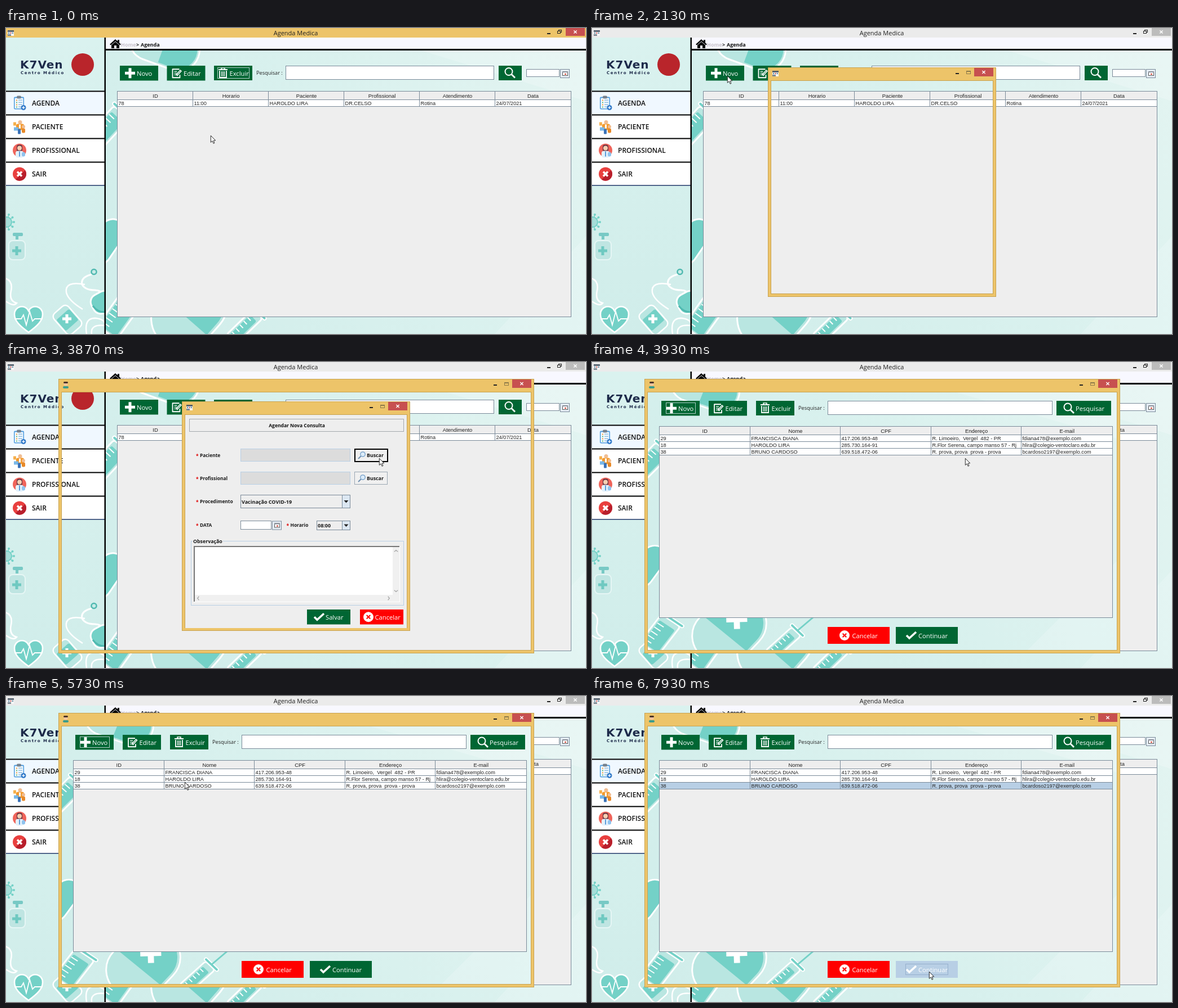
Recreate the animation shown at these times as an HTML page with a canvas. Size 1029 px wide and 544 px high, loop 8000 ms.

```html
<!DOCTYPE html>
<html lang="pt">
<head>
<meta charset="utf-8">
<title>Agenda Medica</title>
<style>
html, body { margin: 0; width: 100%; height: 100%; overflow: hidden; background: #d5eeeb; }
canvas { display: block; width: 1029px; height: 544px; }
</style>
</head>
<body>
<canvas id="stage"></canvas>
<script>
const W = 1029, H = 544, LOOP = 8000, FPS = 15;
const canvas = document.getElementById('stage');
const ctx = canvas.getContext('2d');
const dpr = window.devicePixelRatio || 1;
canvas.width = W * dpr;
canvas.height = H * dpr;

const GREEN = '#006633', RED = '#ff0000', GOLD = '#edc469', GRAY = '#eeeeee';
const LINE = '#7a8a99', SKY = '#b8cfe5', TEAL = '#74d1c7', PALE = '#b9e6e1', DEEP = '#4fb9b0';
const ui = (size, weight = 400) => `${weight} ${size}px "Open Sans", sans-serif`;
const arial = size => `${size}px "Liberation Sans", Arial, sans-serif`;

// --- basic helpers ---
function rect(x, y, w, h, color) {
  ctx.fillStyle = color;
  ctx.fillRect(x, y, w, h);
}
function box(x, y, w, h, color, fill) {
  if (fill) rect(x, y, w, h, fill);
  ctx.strokeStyle = color;
  ctx.lineWidth = 1;
  ctx.strokeRect(x + .5, y + .5, w - 1, h - 1);
}
function text(str, x, y, font, color = '#1a1a1a', align = 'left') {
  ctx.font = font;
  ctx.fillStyle = color;
  ctx.textAlign = align;
  ctx.fillText(str, x, y);
}
function circle(x, y, r, fill, stroke, lw = 1) {
  ctx.beginPath();
  ctx.arc(x, y, r, 0, Math.PI * 2);
  if (fill) { ctx.fillStyle = fill; ctx.fill(); }
  if (stroke) { ctx.strokeStyle = stroke; ctx.lineWidth = lw; ctx.stroke(); }
}
function trace(pts) {
  ctx.beginPath();
  pts.forEach(([x, y], i) => i ? ctx.lineTo(x, y) : ctx.moveTo(x, y));
}
function line(pts, color, lw = 1) {
  trace(pts);
  ctx.strokeStyle = color;
  ctx.lineWidth = lw;
  ctx.stroke();
}
function poly(pts, color) {
  trace(pts);
  ctx.closePath();
  ctx.fillStyle = color;
  ctx.fill();
}
function curve(d, color, lw) {
  ctx.strokeStyle = color;
  ctx.lineWidth = lw;
  ctx.stroke(new Path2D(d));
}
function at(x, y, angle, draw) {
  ctx.save();
  ctx.translate(x, y);
  ctx.rotate(angle);
  draw();
  ctx.restore();
}
function pill(x, y, w, h, r, fill, stroke, lw = 2.5) {
  ctx.beginPath();
  ctx.roundRect(x, y, w, h, r);
  ctx.fillStyle = fill;
  ctx.fill();
  if (stroke) { ctx.strokeStyle = stroke; ctx.lineWidth = lw; ctx.stroke(); }
}
function cross(x, y, r, t, color) {
  rect(x - r, y - t / 2, r * 2, t, color);
  rect(x - t / 2, y - r, t, r * 2, color);
}
function clipped(x, y, w, h, draw) {
  ctx.save();
  ctx.beginPath();
  ctx.rect(x, y, w, h);
  ctx.clip();
  ctx.translate(x, y);
  draw();
  ctx.restore();
}

// --- background illustration ---
function syringe(x, y, angle, w, h) {
  at(x, y, angle, () => {
    pill(-w / 2, -h / 2, w, h, 5, PALE, '#fff', 3);
    pill(-w / 2 + 4, -h / 3, w - 8, h * .78, 3, TEAL);
    for (let i = 0; i < 5; i++) rect(-w / 2 + 4, -h / 4 + i * h / 7, w / 3, 2, '#fff');
    pill(-w / 2 - 5, -h / 2 - 6, w + 10, 6, 3, TEAL, '#fff', 2);
    rect(-1, h / 2, 2, h / 3, '#fff');
  });
}
function backdrop(x, y, w, h) {
  clipped(x, y, w, h, () => {
    ctx.scale(w / 852, h / 504);
    const g = ctx.createLinearGradient(0, 504, 852, 0);
    g.addColorStop(0, '#d0edea');
    g.addColorStop(.55, '#d9f1ee');
    g.addColorStop(1, '#e3f4f1');
    rect(0, 0, 852, 504, g);
    poly([[560, 0], [852, 0], [852, 90]], '#ffffff30');
    poly([[690, 504], [852, 330], [852, 504]], '#ffffff28');
    at(104, -10, .35, () => {
      pill(-64, -37, 128, 74, 37, PALE, '#fff', 3);
      pill(0, -33, 60, 66, [0, 33, 33, 0], TEAL);
    });
    syringe(6, 134, .75, 36, 64);
    at(0, 340, .6, () => pill(-22, -44, 44, 88, 22, TEAL, '#fff', 3));
    syringe(22, 474, .62, 42, 68);
    at(148, 464, .72, () => {
      pill(-56, -72, 112, 144, 54, PALE, '#fff', 3);
      pill(-51, -67, 102, 78, [50, 50, 0, 0], TEAL);
      at(-3, -24, -.75, () => cross(0, 0, 19, 11, '#fff'));
    });
    syringe(246, 491, .8, 24, 66);
    line([[272, 466], [318, 424]], TEAL, 3);
  });
}
function sideArt() {
  const g = ctx.createLinearGradient(0, 17, 0, 544);
  g.addColorStop(0, '#daf2ef');
  g.addColorStop(1, '#d0edea');
  rect(0, 17, 175, 527, g);
  for (let i = 0; i < 10; i++) {
    const a = i * Math.PI / 5, c = Math.cos(a), s = Math.sin(a);
    line([[1, 345], [1 + 13 * c, 345 + 14 * s]], TEAL, 1.5);
    circle(1 + 13 * c, 345 + 14 * s, 2, TEAL);
  }
  circle(1, 345, 9, '#a5ddd8', TEAL, 2);
  pill(12, 364, 18, 6, 2, '#78c9c5');
  rect(17, 369, 5, 7, '#78c9c5');
  pill(5, 378, 29, 34, 7, '#bfe5e2', '#e6f6f5', 2);
  cross(19, 396, 8, 5, '#6fc9c1');
  curve('M-4 444 Q13 448 9 467 T19 489 Q14 496 0 486', '#fff', 2.5);
  curve('M152 438 Q132 443 135 456 Q140 466 158 466 Q180 468 177 490', '#fff', 3);
  curve('M140 456 Q104 449 107 470 Q110 484 136 500', '#fff', 2.5);
  circle(156, 433.5, 4.5, '#c8ebe7', DEEP, 2.5);
  at(167, 490, -.5, () => pill(-15, -18, 40, 36, 14, TEAL, '#fff', 3));
  curve('M154 494 Q163 506 176 505', DEEP, 3);
  curve('M143 544 Q138 514 160 516 Q175 518 176 527 M152 544 Q149 526 176 529', '#fff', 2.5);
  const heart = new Path2D('M40 541 C25 530 15 521 15 509 C15 494 34 490 40 503 C46 490 65 494 65 509 C65 521 55 530 40 541Z');
  ctx.fillStyle = TEAL;
  ctx.fill(heart);
  ctx.strokeStyle = '#fff';
  ctx.lineWidth = 2.5;
  ctx.stroke(heart);
  line([[15, 517], [27, 517], [31, 510], [36, 528], [42, 504], [47, 521], [51, 517], [65, 517]], '#fff', 1.8);
  at(109, 519, -.72, () => {
    pill(-17, -24, 34, 48, 8, PALE, '#fff', 2.5);
    pill(-15, -13, 30, 26, 3, TEAL);
    at(0, 0, .72, () => cross(-1, -2, 8, 5, '#fff'));
  });
}

// --- icons ---
function plusIcon(x, y) { cross(x, y, 9, 5, '#fff'); }
function editIcon(x, y) {
  ctx.lineJoin = 'round';
  line([[x + 5, y - 7], [x - 7, y - 7], [x - 7, y + 8], [x + 6, y + 8], [x + 6, y + 3]], '#fff', 1.8);
  for (const dy of [-3, 0, 3]) line([[x - 4, y + dy], [x + 1, y + dy]], '#fff', 1.2);
  line([[x, y + 4], [x + 8, y - 5]], '#fff', 4);
  line([[x + 1.5, y + 2.5], [x + 7, y - 4]], GREEN, 1);
  ctx.lineJoin = 'miter';
}
function trashIcon(x, y) {
  line([[x - 8, y - 6], [x + 8, y - 6]], '#fff', 2);
  line([[x - 3, y - 7], [x - 3, y - 9], [x + 3, y - 9], [x + 3, y - 7]], '#fff', 1.5);
  line([[x - 6, y - 4], [x - 6, y + 8], [x + 6, y + 8], [x + 6, y - 4]], '#fff', 1.8);
  for (const dx of [-2.5, 0, 2.5]) line([[x + dx, y - 3], [x + dx, y + 6]], '#fff', 1.3);
}
function searchIcon(x, y) {
  line([[x + 2.7, y + 2.7], [x + 9, y + 9]], '#fff', 2.8);
  circle(x - 2, y - 2, 6.5, null, '#fff', 2);
}
function findIcon(x, y) {
  line([[x - 2, y + 2], [x - 7, y + 7]], '#6f8fb0', 2);
  circle(x + 1, y - 1, 4.2, '#dcecf9', '#6f9cc8', 1.3);
}
function checkIcon(x, y) { line([[x - 8, y], [x - 3, y + 5], [x + 9, y - 6]], '#fff', 3.6); }
function xMark(x, y, r, color, lw) {
  line([[x - r, y - r], [x + r, y + r]], color, lw);
  line([[x + r, y - r], [x - r, y + r]], color, lw);
}
function cancelIcon(x, y) {
  circle(x, y, 9, '#fff');
  xMark(x, y, 3.3, RED, 2);
}
function agendaIcon(x, y) {
  pill(x - 10, y - 11, 18, 22, 2, '#4a9ade');
  rect(x - 8.5, y - 9, 15, 18.5, '#f4f9fd');
  pill(x - 5, y - 13, 8, 5, 2, '#77838f');
  for (let i = 0; i < 4; i++) {
    rect(x - 6, y - 6 + i * 4, 2, 2, i % 2 ? '#5cb87a' : '#f29a38');
    rect(x - 2, y - 6 + i * 4, 7, 1.5, '#8fbde4');
  }
  circle(x + 7, y + 8, 4.5, '#2f78c8');
  cross(x + 7, y + 8, 2.5, 1.4, '#fff');
}
function patientIcon(x, y) {
  circle(x + 1, y - 8, 3.5, '#f0bd92');
  pill(x - 6, y - 5, 14, 11, 3, '#f39a2d');
  rect(x - 11, y - 8, 5, 6, '#f6b04c');
  rect(x - 10, y + 1, 8, 6, '#79b8e8');
  pill(x - 3, y + 4, 5, 9, 1, '#3c73b8');
  pill(x + 4, y + 3, 6, 8, 2, '#e88928');
  circle(x + 7, y, 3, '#f0bd92');
  rect(x - 1, y - 4, 3, 7, '#fff');
}
function doctorIcon(x, y) {
  circle(x, y, 12, '#f0645a');
  pill(x - 5, y - 10, 10, 13, 4, '#6a3340');
  circle(x, y - 4, 4, '#f5cfb2');
  pill(x - 7, y + 1, 14, 12, 4, '#e4f1fb');
  rect(x - 1, y + 2, 2, 9, '#5b9bd8');
  pill(x + 4, y + 3, 6, 8, 3, '#8fc3ee');
}
function exitIcon(x, y) {
  circle(x, y, 12, '#e9403f');
  ctx.beginPath();
  ctx.arc(x, y, 12, -.6, 2.2);
  ctx.fillStyle = '#b81f2c';
  ctx.fill();
  xMark(x, y, 4, '#fff', 3.6);
}
function appIcon(x, y) {
  rect(x - 5, y - 5, 11, 10, '#f6f6f6');
  rect(x - 5, y - 5, 11, 3, '#55616e');
  for (let i = 0; i < 3; i++) rect(x - 4 + i * 3.4, y - 1, 2, 2, i === 1 ? '#c94a4a' : '#4a7f9c');
  rect(x - 5, y + 2, 6, 3, '#7d8a94');
}
function personIcon(x, y) {
  circle(x, y - 2, 3.6, '#f1c49d');
  pill(x - 4, y - 6, 8, 3, 2, '#4c3428');
  pill(x - 5, y + 2, 10, 4, 2, '#3b9c8c');
}
function houseIcon() {
  poly([[184, 29], [194, 20], [204, 29], [202, 30.5], [194, 23.5], [186, 30.5]], '#000');
  poly([[187, 30.5], [194, 24.5], [201, 30.5], [201, 36], [196, 36], [196, 31], [192, 31], [192, 36], [187, 36]], '#000');
  rect(198, 21, 3, 5, '#000');
}
function calendarButton(x, y) {
  box(x, y, 17, 16, LINE, '#e6eef6');
  box(x + 4, y + 4, 10, 8, '#555', '#fff');
  rect(x + 4, y + 4, 10, 2, '#8a8f9a');
  rect(x + 8, y + 8, 3, 2, '#d2493c');
}

// --- widgets ---
function button(label, x, y, w, h, icon, iconDx, textDx, opts = {}) {
  rect(x, y, w, h, opts.pressed ? SKY : opts.color || GREEN);
  icon(x + iconDx, y + h / 2);
  text(label, x + textDx, y + h / 2 + 5, ui(11.2), '#fff');
  if (opts.focus) box(...opts.focus, opts.pressed ? '#96b0cd' : '#b4cdc6');
}
function toolbar(x, y, dx, focus = {}) {
  const [novo, editar, excluir] = dx;
  button('Novo', x + novo, y, 68, 26.5, plusIcon, 18, 30, focus.novo);
  button('Editar', x + editar, y, 68, 26.5, editIcon, 17, 29.5);
  button('Excluir', x + excluir, y, 68, 26, trashIcon, 16, 27.5, focus.excluir);
}
function table(x, y, w, h, heads, rows, selected = -1, focusCell = -1) {
  const cw = w / heads.length, edge = i => Math.round(x + i * cw);
  box(x - 1, y, w + 2, h, LINE, GRAY);
  rows.forEach((cells, r) => {
    const top = y + 16 + r * 12;
    rect(x, top, w, 11, r === selected ? SKY : '#fff');
    rect(x, top + 11, w, 1, LINE);
    cells.forEach((s, i) => text(s, edge(i) + 1.5, top + 9, arial(9.2), '#222'));
  });
  rect(x, y + 15, w, 1, LINE);
  heads.forEach((s, i) => {
    text(s, x + (i + .5) * cw, y + 12.3, arial(9.4), '#222', 'center');
    if (i) rect(edge(i) - 1, y + 1, 1, 15 + rows.length * 12, LINE);
  });
  if (focusCell >= 0) box(edge(focusCell) - 1, y + 15 + selected * 12, Math.round(cw) + 1, 13, '#6382bf');
}
function frame(x, y, w, h, icon) {
  const r = x + w, b = y + h;
  rect(x, y, w, 24, GOLD);
  rect(x, y, 6, h, GOLD);
  rect(r - 6, y, 6, h, GOLD);
  rect(x, b - 6, w, 6, GOLD);
  box(x, y, w, h, '#c7a250');
  box(x + 5, y + 23, w - 10, h - 28, '#c7a250');
  icon(x + 13, y + 11);
  rect(r - 72, y + 10, 6, 2, '#222');
  box(r - 53, y + 6, 8, 6, '#8d7a4a');
  rect(r - 53, y + 6, 8, 2, '#8d7a4a');
  rect(r - 39, y + 1, 34, 15, '#c75050');
  xMark(r - 22, y + 8.5, 2.6, '#fff', 1.4);
}
function arrow(x, y, color = '#222') { poly([[x - 4, y - 2], [x + 4, y - 2], [x, y + 2.5]], color); }
function combo(label, x, y, w, h, size) {
  box(x, y, w, h, LINE, GRAY);
  box(x + w - 15, y, 15, h, LINE, '#dce7f2');
  arrow(x + w - 7.5, y + h / 2);
  text(label, x + 2, y + h / 2 + 3.5, ui(size, 700));
}
function label(str, x, y) {
  text('*', x, y + 1, ui(8.4, 700), '#e00000');
  text(str, x + 7, y, ui(8.4, 700));
}
function chevron(x, y, dx, dy) {
  line([[x - dx - dy * 2.5, y - dy - dx * 2.5], [x + dx, y + dy], [x - dx + dy * 2.5, y - dy + dx * 2.5]], '#a8a8a8', 1.3);
}

// --- windows ---
function mainWindow(k) {
  const inactive = k >= 32, pressed = k >= 30 && k < 32;
  sideArt();
  backdrop(177, 40, 852, 504);

  rect(0, 0, W, 17, inactive ? '#ebebeb' : GOLD);
  appIcon(8, 9);
  text('Agenda Medica', 514, 13, ui(11), '#222', 'center');
  rect(960, 9, 6, 2, '#222');
  box(980, 3, 6, 5, '#222');
  box(978, 5, 6, 5, '#222', inactive ? '#ebebeb' : GOLD);
  rect(993, 0, 34, 14, inactive ? '#bcbcbc' : '#c75050');
  xMark(1010, 7, 2.6, '#fff', 1.4);

  ctx.letterSpacing = '1px';
  text('K7Ven', 25, 72, '700 20px "DejaVu Sans", sans-serif', '#1d2a4a');
  ctx.letterSpacing = '1.6px';
  text('Centro Médico', 26, 82, '700 7px "DejaVu Sans", sans-serif', '#1d2a4a');
  ctx.letterSpacing = '0px';
  circle(136, 65, 20, '#b9252b');

  const items = [['AGENDA', agendaIcon], ['PACIENTE', patientIcon], ['PROFISSIONAL', doctorIcon], ['SAIR', exitIcon]];
  items.forEach(([name, icon], i) => {
    const y = 111.5 + i * 42;
    rect(0, y, 175, 42, i ? '#fff' : '#f0f8ff');
    rect(0, y, 175, 2, '#000');
    icon(24, y + 22);
    text(name, 46, y + 26.3, ui(12, 600), '#111');
  });
  rect(0, 279, 175, 1.5, '#24386b');
  rect(174.5, 17, 2.5, 527, '#000');

  rect(177, 17, 852, 20, '#f8f8ff');
  rect(177, 37, 852, 3, '#000');
  houseIcon();
  text('Home', 204, 33, ui(9, 700), '#c9c3cc');
  text('>', 231, 33, ui(9, 700), '#222');
  text('Agenda', 239, 33, ui(9, 700), '#111');

  toolbar(202, 67, [0, 83.5, 167], {
    novo: pressed ? { pressed, focus: [209, 70, 54, 20] } : {},
    excluir: k < 30 ? { focus: [375, 70, 57, 20] } : {}
  });
  text('Pesquisar :', 444, 82.5, ui(9.2), '#222');
  box(496, 67, 370, 25, LINE, '#fff');
  rect(874, 67, 41, 26, GREEN);
  searchIcon(894, 79.5);
  box(923, 73, 59, 14, LINE, '#fff');
  calendarButton(983, 73);
  table(198, 112, 804, 402, ['ID', 'Horario', 'Paciente', 'Profissional', 'Atendimento', 'Data'],
    [['78', '11:00', 'HAROLDO LIRA', 'DR.CELSO', 'Rotina', '24/07/2021']]);
}

function findButton(y, focused) {
  box(618, y, 59, 23, '#9aa7b3', '#f0f0f0');
  if (focused) {
    ctx.strokeStyle = '#000';
    ctx.lineWidth = 2;
    ctx.strokeRect(619, y + 1, 58, 22);
  }
  findIcon(632, y + 11);
  text('Buscar', 640, y + 14.5, ui(8.8, 700));
}
function formDialog(k) {
  frame(312, 70, 405, 408, appIcon);
  if (k < 33) return;
  rect(318, 94, 393, 379, GRAY);
  box(325, 101, 381, 23, '#a3a8ad', GRAY);
  text('Agendar Nova Consulta', 516, 116, ui(8.5, 700), '#111', 'center');
  label('Paciente', 337, 168.5);
  label('Profissional', 337, 210);
  label('Procedimento', 337, 250.5);
  label('DATA', 337, 293);
  label('Horario', 497.5, 293);
  for (const y of [154, 195]) box(416, y, 195, 23, SKY, '#dcdcdc');
  findButton(154, k >= 58);
  findButton(195, false);
  combo('Vacinação COVID-19', 416, 236, 195, 24, 9);
  box(416, 282, 55, 16, LINE, '#fff');
  calendarButton(472, 282.5);
  combo('08:00', 551, 282, 60, 17, 9);

  box(328, 318, 378, 115, SKY);
  rect(331, 314, 54, 9, GRAY);
  text('Observação', 332, 322, ui(8.8, 700));
  rect(333, 327, 366, 100, '#fff');
  rect(333, 327, 365, 2, '#777');
  rect(333, 327, 2, 99, '#777');
  rect(686, 329, 12, 97, '#f0f0f0');
  rect(335, 414, 363, 12, '#f0f0f0');
  chevron(692, 336, 0, -1.3);
  chevron(692, 407, 0, 1.3);
  chevron(341, 420, -1.3, 0);
  chevron(679, 420, 1.3, 0);
  button('Salvar', 534, 440, 77, 26.5, checkIcon, 21, 33);
  button('Cancelar', 628, 440, 77, 26.5, cancelIcon, 15, 26.5, { color: RED });
}

const PATIENTS = [
  ['29', 'FRANCISCA DIANA', '417.206.953-48', 'R. Limoeiro,  Vergel  482 - PR', 'fdiana478@exemplo.com'],
  ['18', 'HAROLDO LIRA', '285.730.164-91', 'R.Flor Serena, campo manso 57 - Rj', 'hlira@colegio-ventoclaro.edu.br'],
  ['38', 'BRUNO CARDOSO', '639.518.472-06', 'R. prova, prova  prova - prova', 'bcardoso2197@exemplo.com']
];
function searchWindow(k) {
  frame(93, 30, 844, 488, personIcon);
  if (k < 59) return;
  const selected = k >= 91, pressed = k >= 119;
  backdrop(99, 54, 832, 458);
  toolbar(123, 69, [0, 84, 168], { novo: selected ? {} : { focus: [131, 72, 53, 20] } });
  text('Pesquisar :', 366, 84.5, ui(9.2), '#222');
  box(418, 69, 399, 25, LINE, '#fff');
  button('Pesquisar', 824, 69, 97, 26, searchIcon, 22, 34);
  table(120, 114, 803, 341, ['ID', 'Nome', 'CPF', 'Endereço', 'E-mail'], PATIENTS,
    selected ? 2 : -1, selected && !pressed ? 1 : -1);
  button('Cancelar', 418, 471, 110, 30, cancelIcon, 30, 43.5, { color: RED });
  button('Continuar', 539, 471, 110, 30, checkIcon, 27, 40,
    pressed ? { pressed, focus: [556, 476, 76, 20] } : {});
}

// --- pointer: tick, x, y ---
const PATH = [
  [0, 363, 191], [13, 363, 191], [23, 240, 85], [37, 240, 85], [42, 578, 108], [46, 695, 145],
  [50, 676, 176], [53, 662, 171], [64, 662, 171], [70, 536, 224], [73, 410, 226], [77, 298, 168],
  [82, 307, 136], [88, 319, 159], [96, 319, 159], [102, 511, 249], [109, 606, 407], [116, 598, 490],
  [120, 598, 490]
];
function slope(i, c) {
  const a = PATH[i - 1], p = PATH[i], b = PATH[i + 1];
  if (!a || !b) return 0;
  const rest = q => q[1] === p[1] && q[2] === p[2];
  return rest(a) || rest(b) ? 0 : (b[c] - a[c]) / (b[0] - a[0]);
}
function pointerAt(k) {
  const i = Math.max(0, PATH.findIndex(p => p[0] > k) - 1);
  const a = PATH[i], b = PATH[i + 1], d = b[0] - a[0], u = (k - a[0]) / d;
  return [1, 2].map(c => {
    const s = u * u * (3 - 2 * u);
    return Math.round(a[c] + (b[c] - a[c]) * s
      + d * (slope(i, c) * u * (1 - u) ** 2 - slope(i + 1, c) * u * u * (1 - u)));
  });
}
function pointer(k) {
  const [x, y] = pointerAt(k);
  const pts = [[0, 0], [0, 12], [2.8, 9.5], [4.8, 14], [6.6, 13.2], [4.8, 8.8], [8.4, 8.6], [0, 0]]
    .map(([px, py]) => [x + px + .3, y + py + .3]);
  poly(pts, '#fff');
  line(pts, '#111', .9);
}

function draw(k) {
  ctx.setTransform(dpr, 0, 0, dpr, 0, 0);
  mainWindow(k);
  if (k >= 32) formDialog(k);
  if (k >= 58) searchWindow(k);
  pointer(k);
}

const start = performance.now();
let shown = -1;
function tick() {
  const t = (performance.now() - start) % LOOP;
  const k = Math.min(119, Math.floor((t + 5) * FPS / 1000));
  if (k !== shown) draw(shown = k);
  requestAnimationFrame(tick);
}
tick();
</script>
</body>
</html>
```
